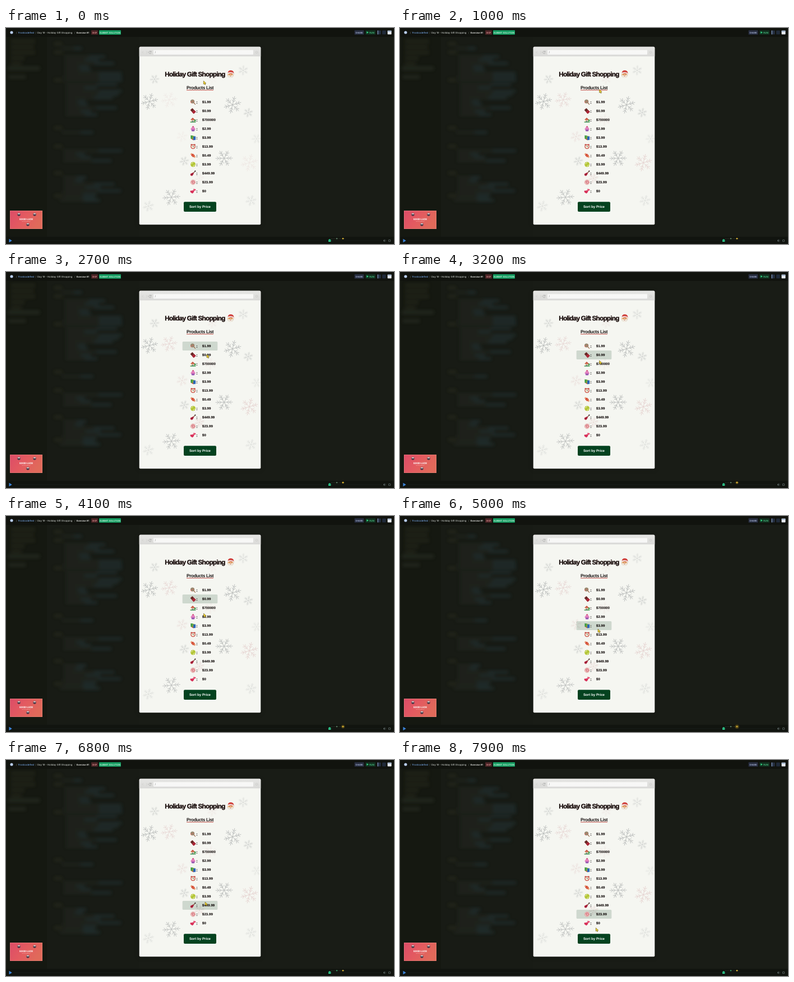
An HTML page for the animation above (8000 ms loop, 692x388 px).

```html
<!DOCTYPE html>
<html lang="en">
<head>
<meta charset="utf-8">
<title>Holiday Gift Shopping</title>
<style>
html, body { margin: 0; width: 100%; height: 100%; overflow: hidden; background: #171a14; }
svg { display: block; width: 100%; height: 100%; }
text { text-rendering: geometricPrecision; }
.ui { font: 500 4.3px Inter, "Open Sans", sans-serif; }
.shop { font-family: "Liberation Sans", Arial, sans-serif; font-weight: 700; fill: #16100f; }
.title { font-size: 11.7px; letter-spacing: -.73px; }
.mid { text-anchor: middle; }
</style>
</head>
<body>
<svg viewBox="0 0 692 388" preserveAspectRatio="none">
  <defs>
    <filter id="soft" x="-20%" y="-20%" width="140%" height="140%"><feGaussianBlur stdDeviation="3.4"/></filter>
    <filter id="shade" x="-20%" y="-20%" width="140%" height="140%"><feGaussianBlur stdDeviation="5"/></filter>
    <linearGradient id="pink" x2="1" y2=".4"><stop stop-color="#dc4c68"/><stop offset=".5" stop-color="#e35a60"/><stop offset="1" stop-color="#e06a5a"/></linearGradient>
    <linearGradient id="bar" x2="0" y2="1"><stop stop-color="#e6e6e4"/><stop offset="1" stop-color="#dadad8"/></linearGradient>
    <clipPath id="page"><path d="M238 51H454V353H238Z"/></clipPath>
    <path id="arm" d="M0 0V-1M0-.38L-.2-.56M0-.38L.2-.56M0-.64L-.2-.84M0-.64L.2-.84"/>
    <g id="flake" fill="none" stroke-linecap="round" stroke-width=".055"></g>
  </defs>

  <rect width="692" height="388" fill="#191c16"/>
  <rect y="16" width="73" height="359" fill="#151811"/>
  <rect x="73" y="16" width="165" height="359" fill="#181b15"/>
  <g id="code" filter="url(#soft)"></g>
  <rect width="692" height="16" fill="#11130e"/>
  <rect y="375" width="692" height="13" fill="#11140f"/>

  <g class="ui">
    <circle cx="10" cy="8" r="2.6" fill="#b9cdf2"/>
    <g fill="#7d827c"><text x="18" y="9.5">/</text><text x="52.5" y="9.5">/</text><text x="122" y="9.5">/</text></g>
    <text x="21.8" y="9.5" fill="#78a8e8">Frostcodefest</text>
    <text x="56" y="9.5" fill="#c4c8c4">Day 19 - Holiday Gift Shopping</text>
    <text x="125.8" y="9.5" fill="#f4f5f2" font-weight="600" font-size="4.1">Exercise #1</text>
    <rect x="152" y="4" width="12" height="8" rx="1" fill="#4b2426"/>
    <text class="mid" x="158" y="9.5" fill="#e59a99" font-size="3.9">SKIP</text>
    <rect x="166" y="4" width="39" height="8" rx="1" fill="#169d62"/>
    <text class="mid" x="185.5" y="9.5" fill="#eafff2" font-size="4">SUBMIT SOLUTION</text>
    <rect x="621.5" y="4" width="17" height="8" rx="1" fill="#272d3f"/>
    <text class="mid" x="630" y="9.5" fill="#b9c6ea" font-size="4">SHARE</text>
    <rect x="641" y="4" width="18" height="8" rx="1" fill="#12301f"/>
    <path d="M643.3 6V10L646.8 8Z" fill="#32d583"/>
    <text x="648.2" y="9.5" fill="#55d994" font-size="4">RUN</text>
    <rect x="662" y="4.5" width="6.5" height="7" rx=".8" fill="#263043"/>
    <path d="M662.5 4.5h1.6v7h-1.6Z" fill="#6c7f9d"/>
    <rect x="671" y="4.5" width="6.5" height="7" rx=".8" fill="#202a3a"/>
    <rect x="680.5" y="4.5" width="7" height="7" rx=".8" fill="#e9edf4"/>
    <path d="M680.5 5.3h7v1h-7Z" fill="#6688b0"/>
  </g>

  <rect x="238" y="36" width="216" height="318" fill="#050604" opacity=".3" filter="url(#shade)"/>
  <rect x="237.7" y="33.7" width="216.6" height="319.6" rx="2" fill="#f5f6f1"/>
  <path d="M237.7 51V35.7a2 2 0 0 1 2-2H452.3a2 2 0 0 1 2 2V51Z" fill="url(#bar)"/>
  <rect x="263" y="39.5" width="178" height="8.3" rx="1" fill="#f7f7f6"/>
  <g fill="none" stroke="#c4c4c2" stroke-width=".6">
    <path d="M245 41.6L243 43.6L245 45.6M250.5 41.6L252.5 43.6L250.5 45.6"/>
    <path d="M258.7 42.5A2.2 2.2 0 1 0 259 44.4M259 41V43H257" stroke="#979795"/>
    <circle cx="447" cy="43.5" r="1.8"/>
  </g>
  <text class="ui" x="265.5" y="45.3" fill="#777">/</text>

  <g id="snow" clip-path="url(#page)"></g>
  <rect id="hover" x="314.7" width="62.6" height="16" rx="1.6" fill="#003c1e" fill-opacity=".16"/>

  <g class="shop">
    <text class="title" x="283.6" y="87.3" fill="#e59a94" opacity=".6">Holiday Gift Shopping</text>
    <text class="title" x="283.2" y="86.9" stroke="#16100f" stroke-width=".3">Holiday Gift Shopping</text>
    <text x="322" y="110" font-size="8.2" letter-spacing="-.32">Products List</text>
    <path d="M322 111.6H370" stroke="#b73a35" stroke-width=".9"/>
    <g id="list" font-size="6.17" stroke="#16100f" stroke-width=".1"></g>
  </g>

  <g transform="translate(400.5 82.6)">
    <path d="M-5.6-.5Q-6.6 6.6 0 6.7T5.4-.5Z" fill="#dccdb8"/>
    <path d="M-4.6-.6H4.4V2.4Q3.6 5 0 5T-4.4 2.4Z" fill="#efb27a"/>
    <path d="M-4.9 2.2Q-2.4 1.8 0 2.8Q2.4 1.8 4.7 2.2Q4 6.3 0 6.4T-4.9 2.2Z" fill="#f1ebdf"/>
    <path d="M-5-1.4Q-4.4-6.6 .6-6.5Q6-6.2 6-.4H4Z" fill="#cf3d3a"/>
    <path d="M-5.2-.8Q-1.6-3.9 4.4-1.5" fill="none" stroke="#f4f0ea" stroke-width="1.8" stroke-linecap="round"/>
    <circle cx="5.6" cy=".2" r="1.3" fill="#f4f0ea" stroke="#d9cfc0" stroke-width=".3"/>
    <path d="M-1.8 .6v.9M1.6 .6v.9" stroke="#4b2b20" stroke-width=".8"/>
    <path d="M-1.1 3.6Q0 4.6 1.1 3.6" stroke="#a6372d" stroke-width=".7" fill="none"/>
  </g>

  <rect x="317" y="312.2" width="58" height="17.8" rx="2" fill="#04421f"/>
  <text class="shop mid" x="346" y="323.3" font-size="6.17" style="fill:#fff">Sort by Price</text>

  <rect x="7" y="328" width="58" height="33" fill="url(#pink)"/>
  <rect x="7.4" y="328.4" width="57.2" height="32.2" fill="none" stroke="#e59a8e" stroke-width=".8" opacity=".5"/>
  <g id="balls"></g>
  <text class="mid" x="36" y="345" fill="#fff" style="font:700 4.5px Roboto,sans-serif">GOOD LUCK</text>
  <text class="mid" x="36" y="348.4" fill="#fbd5d0" style="font:2px Inter,sans-serif">on this exercise</text>

  <path d="M5.5 378.8V385.2L10.8 382Z" fill="#3b82d6"/>
  <path d="M14 382H670" stroke="#1a201c" stroke-width=".8"/>
  <path d="M580 378.3H604" stroke="#59604f" stroke-width=".6" stroke-dasharray="1 1.3"/>
  <path d="M575 384V380.6L577.2 379L579.4 380.6V384Z" fill="#2fc98c"/>
  <path d="M575.2 381.5H579.2" stroke="#126b49" stroke-width=".5"/>
  <circle id="green" cx="590" cy="378.3" r="1.1"/>
  <circle id="glow" cx="601" cy="378.3" fill="#e5b520" opacity=".28"/>
  <circle cx="601" cy="378.3" r="1.2" fill="#edc13a"/>
  <g fill="#515a59">
    <path d="M673 380.8h1.2l1.5-1.3v5l-1.5-1.3H673Z"/>
    <path d="M676.7 380.5Q678.2 382 676.7 383.5" fill="none" stroke="#515a59" stroke-width=".6"/>
    <circle cx="684" cy="382" r="1.8" fill="none" stroke="#515a59" stroke-width="1.1"/>
  </g>

  <path id="cursor" d="M0 0V6L1.5 4.9L2.5 7L3.7 6.4L2.7 4.5L4.6 4.3Z" fill="#f1d32c" stroke="#4a3b08" stroke-width=".5" stroke-linejoin="round"/>
</svg>
<script>
const LOOP = 8000;
const $ = id => document.getElementById(id);
const rowY = n => 117 + n * 16;

// Blurred editor: [top, number of lines, indent]
const blocks = [[35, 1, 100], [50, 8, 104], [100, 10, 106], [186, 1, 100], [219, 4, 102], [267, 7, 102], [308, 1, 96]];
let seed = 19;
const rand = () => (seed = seed * 16807 % 2147483647) / 2147483647;
const blob = (x, y, w, h, fill, o) => `<rect x="${x}" y="${y}" width="${w}" height="${h}" fill="${fill}" opacity="${o}"/>`;
let code = "";
for (const [top, count, left] of blocks) {
  code += blob(86, top - 8, 14, 3, "#6b6d42", .25);
  for (let i = 0; i < count; i++) {
    const w = 35 + rand() * 75;
    code += blob(left, top + i * 6, w, 3, "#48524a", .24);
    code += blob(left + w * .6, top + i * 6, w * .4, 3, "#245b78", .28);
  }
}
for (let i = 0; i < 5; i++) code += blob(9, 22 + i * 10, 18 + rand() * 25, 4, "#5c5b3e", .26);
code += blob(4, 70, 56, 5, "#4c5540", .34) + blob(5, 86, 30, 4, "#596052", .3);
$("code").innerHTML = code;

// Snowflakes: x, y, radius, colour, opacity
$("flake").innerHTML = [0, 60, 120, 180, 240, 300].map(a => `<use href="#arm" transform="rotate(${a})"/>`).join("");
const grey = "#85898b", rose = "#cfa0a2";
const flakes = [
  [256, 132, 15, grey, .55], [404, 138, 15.5, grey, .55], [389, 234, 15, grey, .55], [295, 304, 15.5, grey, .5],
  [432, 152, 8.5, grey, .42], [265, 92, 8.5, grey, .38], [423, 76, 9, grey, .3], [318, 239, 8.5, grey, .4],
  [254, 320, 10, grey, .24], [437, 310, 10, grey, .24], [314, 195, 10, rose, .3], [291, 129, 14.5, rose, .36],
  [434, 242, 15.5, rose, .42], [345, 270, 9, rose, .4], [447, 199, 9, grey, .18], [365, 165, 11, rose, .16],
  [368, 92, 9, rose, .18]
];
$("snow").innerHTML = flakes.map(([x, y, r, c, o]) =>
  `<use href="#flake" class="${c === rose ? "rose" : ""}" transform="translate(${x} ${y}) rotate(${x % 30}) scale(${r})" stroke="${c}" opacity="${o}"/>`).join("");
const roses = [...document.querySelectorAll(".rose")].map(el => [el, +el.getAttribute("opacity")]);

// Product icons, each centred on 0,0 and about ten pixels wide
const heart = "M0 3.2C-6-.4-3-4.4 0-1.7C3-4.4 6-.4 0 3.2Z";
const icons = [
  `<path d="M0 0L4.3 4.5" stroke="#9d7756" stroke-width="1.2"/><circle cx="-1" cy="-1" r="3.6" fill="#d9665d"/><path d="M-3.6-1A2.6 2.6 0 1 1-1 1.5A1.4 1.4 0 1 1-.8-1.3" fill="none" stroke="#5fa980" stroke-width="1.1"/>`,
  `<g transform="rotate(-42)"><rect x="-2.6" y="-4.6" width="5.2" height="9.2" rx=".5" fill="#75302e"/><path d="M0-4.3V0M-2.4-2.3H2.4" stroke="#451b1a" stroke-width=".6"/><path d="M-2.8 0H2.8V4.6H-2.8Z" fill="#ad2738"/></g>`,
  `<circle cx="3.1" cy="1" r="2" fill="#3e9b51"/><path d="M-3.3-.5H2.2V4H-3.3Z" fill="#e6c69c"/><path d="M-4.6 0L-.6-4L3.5 0Z" fill="#c75743"/><path d="M-1.5 1.2H.5V4H-1.5Z" fill="#6d88ad"/><path d="M-5 4H4.8" stroke="#389451" stroke-width="1.4"/>`,
  `<path d="M-3.2 1H3.2L2.3 4.6H-2.3Z" fill="#9656b0"/><path d="M-4 1.4Q-4.6-1-2.6-1.4Q-2.4-4 0-4.6Q2.4-4 2.6-1.4Q4.6-1 4 1.4Z" fill="#e380bd"/><circle cy="-4" r="1" fill="#c53a52"/>`,
  `<path d="M-4.2-4.2L.4-3.6V2.4L-4.2 1.8Z" fill="#3f9c42"/><path d="M-1.4-2.8L2.6-3.2V3L-1.4 3.6Z" fill="#86a93c"/><path d="M.4-2L4.6-2.4V4L.4 4.6Z" fill="#2c66b8"/><path d="M-4.2 1.8L.4 4.6V2.4Z" fill="#c4503e"/>`,
  `<circle cx="-2.8" cy="-3.2" r="1.4" fill="#b43932"/><circle cx="2.8" cy="-3.2" r="1.4" fill="#b43932"/><path d="M-2.5 3L-3.6 4.6M2.5 3L3.6 4.6" stroke="#7d3029"/><circle r="3.7" fill="#f4ead8" stroke="#c8473e" stroke-width="1.2"/><path d="M0-2.2V0L1.7 .9" fill="none" stroke="#443" stroke-width=".7"/>`,
  `<g transform="rotate(42)"><path d="M-5-2L-2.4 0L-5 2ZM5-2L2.4 0L5 2Z" fill="#e88a52"/><rect x="-3" y="-2.3" width="6" height="4.6" rx="1.5" fill="#cf382f"/><path d="M-1-2.2L.2 2.2M1.2-2.2L2.2 1.6" stroke="#f0b86c" stroke-width=".7"/></g>`,
  `<circle r="4.5" fill="#b4c638"/><path d="M-4.1-1.2Q0-1-.6-4.3M4.1 1.2Q0 1 .6 4.3" fill="none" stroke="#f2f5d2" stroke-width=".8"/>`,
  `<path d="M-1.4 1.4L4-4" stroke="#74513a" stroke-width="1.3"/><path d="M3.2-4.7L4.7-3.2" stroke="#33272a" stroke-width="1.6"/><circle cx="-2.4" cy="2.3" r="2.4" fill="#b5253f"/><circle cx="-.5" cy=".5" r="1.7" fill="#b5253f"/><circle cx="-1.8" cy="1.8" r=".8" fill="#471b20"/>`,
  `<circle r="4.3" fill="#efc4bf" stroke="#d78686" stroke-width=".8" stroke-dasharray="1.7 .8"/><path d="M-2.5 .2A2.5 2.5 0 1 1 0 2.5A1.5 1.5 0 1 1 .4-.6" fill="none" stroke="#cf596c" stroke-width="1"/>`,
  `<path d="${heart}" transform="translate(-1.4 1.2) rotate(-12)" fill="#d83059"/><path d="${heart}" transform="translate(2.7 -2.3) rotate(14) scale(.62)" fill="#e5476d"/>`
];
const prices = ["1.99", "0.99", "700000", "2.99", "3.99", "13.99", "0.49", "3.99", "449.99", "23.99", "0"];
$("list").innerHTML = prices.map((p, i) => {
  const y = rowY(i + 1);
  return `<g transform="translate(333.6 ${y})" stroke="none">${icons[i]}</g><text x="339.2" y="${y + 2.5}" font-size="7.5">:</text><text x="350" y="${y + 2.2}">$${p}</text>`;
}).join("");

$("balls").innerHTML = [[23, 335], [51, 335], [39, 353]].map(([x, y]) =>
  `<circle cx="${x}" cy="${y}" r="2.7" fill="#4a3a48"/><path d="M${x - 2.4} ${y - .6}a2.5 2.5 0 0 1 4.8 0Z" fill="#e9dedd"/>`).join("");

// Motion: [time, values...]
const path = [[0, 352.3, 95], [900, 355, 108], [2000, 361, 134], [2700, 358, 148], [3200, 355.5, 159], [3600, 353, 168],
  [3800, 353, 168], [4100, 352.5, 175], [4300, 352.5, 175], [5000, 353, 203], [5400, 352.5, 212], [6000, 352.5, 226.5],
  [6800, 355, 255], [7300, 353, 276], [7900, 349.2, 301.5], [8000, 349, 302]];
const glowSize = [[0, 1.3], [2200, 1.3], [3200, 2.6], [5000, 3.6], [6000, 4], [6400, 1.3], [8000, 1.3]];
const rows = [[0, 0], [2300, 1], [2900, 2], [4500, 4], [4800, 5], [5300, 6], [5700, 7], [6300, 8], [6600, 9], [7200, 10]];

function at(keys, t) {
  let i = 1;
  while (i < keys.length - 1 && keys[i][0] < t) i++;
  const a = keys[i - 1], b = keys[i], k = (t - a[0]) / (b[0] - a[0]);
  return a.slice(1).map((v, j) => v + (b[j + 1] - v) * k);
}

function draw(t) {
  const [x, y] = at(path, t), [r] = at(glowSize, t);
  $("cursor").setAttribute("transform", `translate(${x.toFixed(2)} ${y.toFixed(2)})`);
  const row = rows.filter(k => k[0] <= t).pop()[1];
  $("hover").style.display = row ? "" : "none";
  $("hover").setAttribute("y", rowY(row) - 8);
  $("glow").setAttribute("r", r.toFixed(2));
  $("green").setAttribute("fill", t >= 6400 ? "#3dba7c" : "#6d9478");
  const settle = .4 + .6 * Math.min(1, t / 1000);
  for (const [el, o] of roses) el.setAttribute("opacity", (o * settle).toFixed(3));
}

const start = performance.now();
function tick() {
  const t = (performance.now() - start) % LOOP;
  draw(Math.floor(t / 100) * 100);
  requestAnimationFrame(tick);
}
tick();
</script>
</body>
</html>
```
